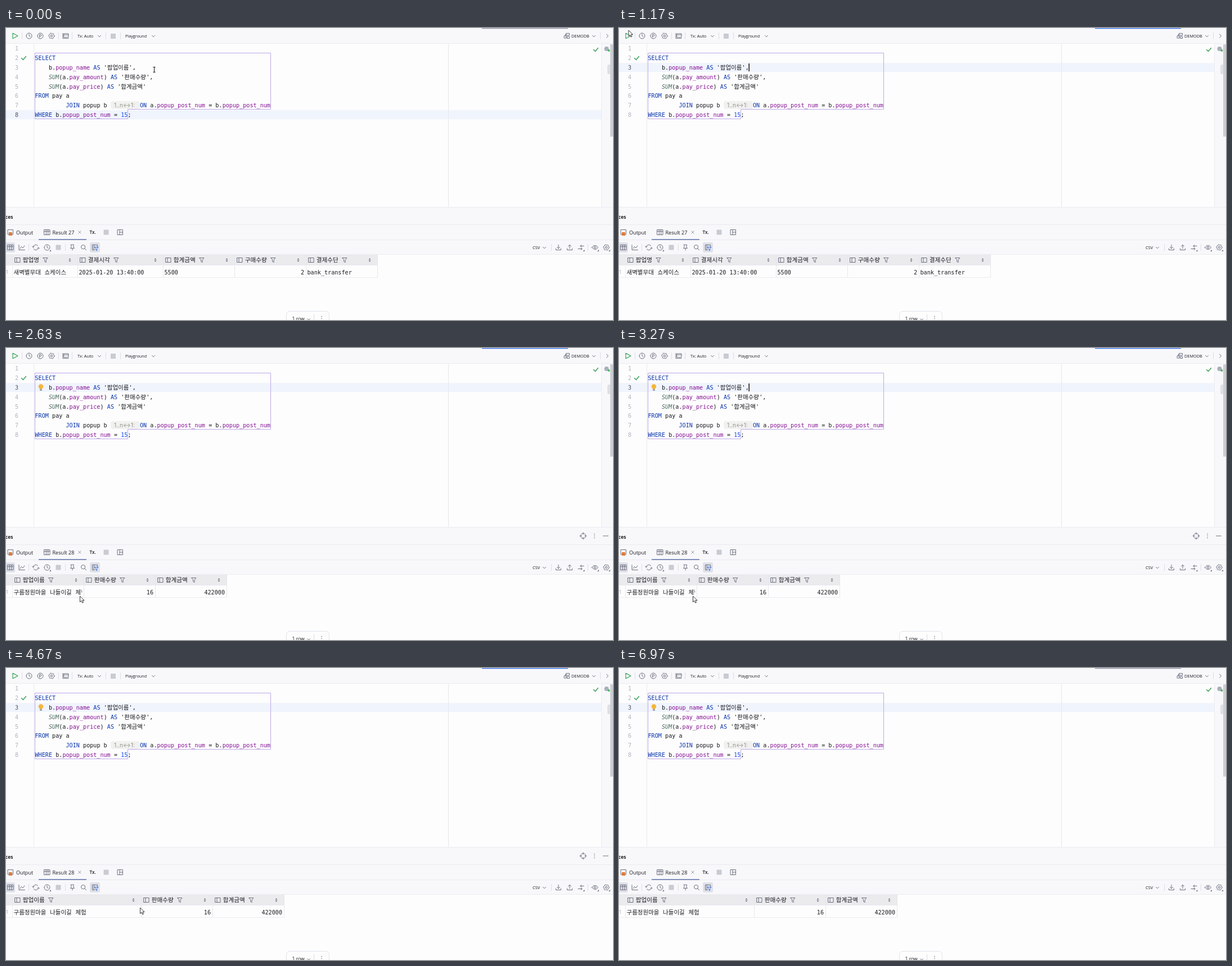
An HTML page for the animation above (7 s loop, 1079 by 519 pixels).

```html
<!DOCTYPE html>
<html lang="ko">
<head>
<meta charset="utf-8">
<title>SQL console</title>
<style>
html, body { margin: 0; width: 100%; height: 100%; overflow: hidden; background: #fdfdfd; }
svg { display: block; position: absolute; left: 0; top: 0; }
text { white-space: pre; fill: #1c1d22; }
.m { font: 10.15px "DejaVu Sans Mono", monospace; }
.k { font: 10.5px "Noto Sans CJK KR", "Noto Sans CJK", sans-serif; word-spacing: 3.7px; }
.h { font: 10.6px "Noto Sans CJK KR", "Noto Sans CJK", sans-serif; }
.u { font: 9.1px "Open Sans", "Noto Sans", sans-serif; }
.s { font: 7.5px "Open Sans", "Noto Sans", sans-serif; }
.i { fill: none; stroke: #6c707e; stroke-width: 1; stroke-linecap: round; stroke-linejoin: round; }
</style>
</head>
<body>
<svg id="stage" width="1079" height="519" viewBox="0 0 1079 519"></svg>
<script>
const LOOP = 7000;
const T = { click: 500, run: 1600, bulb: 1800, blur: 6750 };
const PANEL = '#f8f8fb', EDGE = '#ebecf0', ICON = '#6c707e', GREEN = '#3fa35a';
const KEY = '#0a35ad', COL = '#871094', INK = '#17181c', FUNC = '#4d6b60', NUM = '#1750eb';

const rect = (x, y, w, h, fill, more = '') =>
  `<rect x="${x}" y="${y}" width="${w}" height="${h}" fill="${fill}" ${more}/>`;
const text = (x, y, str, cls, more = '') =>
  `<text x="${x}" y="${y}" class="${cls}" ${more}>${str.replace(/</g, '&lt;').replace(/>/g, '&gt;')}</text>`;
const tint = c => `style="fill:${c}"`;
const endAt = 'text-anchor="end"';
const icon = (x, y, d, more = '') =>
  `<path class="i" transform="translate(${x} ${y})" d="${d}" ${more}/>`;
const ring = r => `M${-r} 0a${r} ${r} 0 1 0 ${2 * r} 0a${r} ${r} 0 1 0 ${-2 * r} 0`;
const box = (x, y, w, h) => `M${x} ${y}h${w}v${h}h${-w}z`;
const vline = (x, y, h, c = '#dcdee5') => rect(x, y, 1, h, c);

const CLOCK = ring(5) + 'M0-3V0L2.3 1.5';
const CHEVRON = 'M-2.5-1.2L0 1.3L2.5-1.2';
const TABLE = box(-5, -4.5, 10, 9) + 'M-5-1.5H5M-1.7-4.5V4.5M1.7-4.5V4.5';
const COLUMN = box(-4.5, -4, 9, 8) + 'M-1.5-4V4';
const FUNNEL = 'M-4-4H4L1.2-.3V4L-1.2 2.7V-.3z';
const LAYOUT = box(-4.5, -4.5, 9, 9) + 'M-1-4.5V4.5M-1 0H4.5';
const gear = () => {
  let d = '';
  for (let n = 0; n < 24; n++) {
    const a = n * Math.PI / 12, r = n % 4 < 2 ? 5.2 : 4.1;
    d += (n ? 'L' : 'M') + (r * Math.cos(a)).toFixed(2) + ' ' + (r * Math.sin(a)).toFixed(2);
  }
  return d + 'z' + ring(1.7);
};
const dots = (x, y) => [-3.5, 0, 3.5].map(d =>
  `<circle cx="${x}" cy="${y + d}" r=".8" fill="${ICON}"/>`).join('');
const corner = (x, y) => `<path d="M${x} ${y}v-3l-3 3z" fill="${ICON}"/>`;
const stop = (x, y) => rect(x - 4.5, y - 4.5, 9, 9, '#c9cbd3', 'rx="1"');

const lineY = n => 40.2 + 16.83 * (n - 1);
const colX = n => 51.5 + 6.11 * n;

// Each part: text, colour, optional class; Hangul glyphs are wider than the mono cells.
function codeLine(n, col, parts, x = colX(col)) {
  return parts.map(([str, color, cls = 'm']) => {
    const out = text(x, lineY(n), str, cls, `style="fill:${color}${color === FUNC ? ';font-style:italic' : ''}"`);
    x += str.length * (cls === 'k' ? 9.7 : 6.11);
    return out;
  }).join('');
}
const alias = (str, tail) => [['AS ', KEY], ["'", INK], [str, INK, 'k'], ["'" + tail, INK]];

function code() {
  return codeLine(2, 0, [['SELECT', KEY]]) +
    codeLine(3, 4, [['b.', INK], ['popup_name ', COL], ...alias('팝업이름', ',')]) +
    codeLine(4, 4, [['SUM', FUNC], ['(a.', INK], ['pay_amount', COL], [') ', INK], ...alias('판매수량', ',')]) +
    codeLine(5, 4, [['SUM', FUNC], ['(a.', INK], ['pay_price', COL], [') ', INK], ...alias('합계금액', '')]) +
    codeLine(6, 0, [['FROM ', KEY], ['pay a', INK]]) +
    codeLine(7, 9, [['JOIN ', KEY], ['popup b', INK]]) +
    rect(186, 130, 52, 14, '#f1f1f0', 'rx="4"') +
    text(192, 140.5, '1..n<->1:', 'm', 'style="font:10.2px Inter,sans-serif;fill:#96968e"') +
    codeLine(7, 0, [['ON ', KEY], ['a.', INK], ['popup_post_num', COL], [' = b.', INK], ['popup_post_num', COL]], 238) +
    codeLine(8, 0, [['WHERE ', KEY], ['b.', INK], ['popup_post_num', COL], [' = ', INK], ['15', NUM], [';', INK]]);
}

function topBar() {
  return rect(0, 0, 1079, 27, PANEL) + rect(0, 27, 1079, 1, EDGE) +
    icon(16, 14, 'M-4-4.8L5 0L-4 4.8z', `style="stroke:${GREEN};stroke-width:1.2"`) +
    [28, 93, 117, 177, 203].map(x => vline(x, 8, 12)).join('') +
    icon(41, 14, CLOCK) + icon(61, 14, ring(5) + 'M-1.4 2.8V-2.6H.3a1.6 1.6 0 0 1 0 3.2H-1.4') +
    icon(81, 14, gear()) + icon(106, 14, box(-3, -4, 8, 6.5) + 'M-5-4.5V4.5H5M-3-1.8H5') +
    text(127, 17, 'Tx: Auto', 's') + icon(166, 14.5, CHEVRON) + stop(190.5, 14.5) +
    text(212, 17, 'Playground', 's', 'style="font-size:7.2px"') + icon(262, 14.5, CHEVRON) +
    icon(997, 14, box(-1, -4.5, 5.5, 3.5) + box(-4.5, 0, 3.5, 4) + box(1, 1, 3.5, 3.5) + 'M-3 0V-2.5H-1') +
    text(1005, 17, 'DEMODB', 's', 'style="font-size:7.3px"') + icon(1045, 14.5, CHEVRON) +
    vline(1056, 8, 12) + icon(1069, 14, 'M-1.5-3L1.5 0L-1.5 3');
}

function editor() {
  const check = 'M-4 0L-1 3L4-3';
  const green = `style="stroke:${GREEN};stroke-width:1.5"`;
  return rect(0, 28, 1079, 290, '#fdfdfd') + '<g id="lineMark"></g>' +
    vline(49, 28, 290, EDGE) + vline(786, 28, 290, '#e6e7ec') +
    rect(1059, 28, 20, 290, PANEL) + vline(1058, 28, 290, EDGE) +
    rect(1069, 65, 10, 17, '#dfe1e8', 'rx="3"') + rect(1074, 29, 5, 164, '#cdced3') +
    '<circle cx="1067.5" cy="37" r="4" fill="#a9b0b9"/><circle cx="1071.5" cy="40" r="2" fill="#4bb563"/>' +
    icon(31.5, 53.5, check, green) + icon(1048.5, 38.5, check, green) +
    '<path d="M51.5 44.5H470.5V144.5H216.5V161.5H51.5z" fill="none" stroke="#bda9e8"/>' + code() +
    `<g id="bulb"><circle cx="62" cy="68.5" r="4.2" fill="#f4b63c"/>${rect(60, 72, 4, 1.4, '#e0a02e')}${rect(60, 74, 4, 1.4, '#6c707e')}</g>` +
    rect(230.5, 63, 1.4, 14, '#000', 'id="caret"');
}

function panel() {
  const y = 390;
  return rect(0, 318, 1079, 85, PANEL) +
    [318, 349, 376, 402].map(v => rect(0, v, 1079, 1, EDGE)).join('') +
    text(12.5, 338.5, 'Services', 'u', endAt + ' style="font-size:8.5px;font-weight:700"') +
    `<g id="tools">${icon(1026, 334, ring(4.6) + 'M0-6V-2.5M0 6V2.5M-6 0H-2.5M6 0H2.5')}${dots(1046, 334)}${icon(1066, 334, 'M-4.5 0H4.5')}</g>` +
    icon(8, 363, box(-4.5, -4.5, 9, 8.5)) + rect(5, 363, 6, 6, '#d97b3f') +
    text(18, 367, 'Output', 'u') +
    icon(73, 363, TABLE) + '<g id="tab"></g>' + icon(131, 363, 'M-2.3-2.3L2.3 2.3M-2.3 2.3L2.3-2.3', 'style="stroke:#9a9da8"') +
    rect(58, 375, 85, 2, '#8190ba') +
    text(148.5, 366.3, 'Tx.', 'u', 'style="font-size:8.3px;font-weight:600"') + stop(178, 363) + icon(203, 363, LAYOUT) +
    rect(-2, 381, 18, 18, '#dfe1ea', 'rx="3"') + icon(8, y, TABLE) +
    icon(28, y, 'M-5-4.5V4.5H5.5M-3 2L-.5-1.5L2 1L5-3') + vline(40, 384, 12) +
    icon(53, y, 'M-4.8-.5A4.8 4.8 0 0 1 3.8-2.8M4.8.5A4.8 4.8 0 0 1-3.8 2.8M-6.3-2L-4.8 0L-3-1.5M6.3 2L4.8 0L3 1.5') +
    icon(73, y, CLOCK) + corner(80, 397) + stop(93, y) + vline(105, 384, 12) +
    icon(118, y, 'M-2.5-4.8H2.5L1.8-1L3.5 1.5H-3.5L-1.8-1zM0 1.5V5') +
    icon(138, y, 'M-4.5-.8a3.6 3.6 0 1 0 7.2 0a3.6 3.6 0 1 0-7.2 0M1.7 1.8L4.7 4.8') +
    rect(149, 381, 18, 18, '#dfe1ea', 'rx="3"') +
    icon(158, y, 'M-1 4.5H-4.5V-4.5H4.5V-1.5M-1.8-4.5V4.5') +
    icon(160.5, 392, 'M-3-2.5H3.5L1 .5V3.5L-.7 2.8V.5z', 'style="stroke:#4673d2;fill:#dce6fb"') +
    text(936, 393, 'CSV', 's') + icon(957, 390.5, CHEVRON) + vline(969, 384, 12) +
    icon(982, y, 'M0-4.5V2M-2.5-.5L0 2L2.5-.5M-4.5 2V4.5H4.5V2') +
    icon(1002, y, 'M0 2V-4.5M-2.5-2L0-4.5L2.5-2M-4.5 2V4.5H4.5V2') +
    icon(1022, y, 'M-5 2.5H2M0 .5L2 2.5L0 4.5M5-2.5H-1M1-4.5L-1-2.5L1-.5') + corner(1028.5, 397) +
    vline(1034, 384, 12) + icon(1047, y, 'M-5.5 0Q0-7.5 5.5 0Q0 7.5-5.5 0z' + ring(1.8)) + corner(1054, 397) +
    icon(1067, y, gear()) + corner(1074, 397);
}

function pager() {
  return rect(498.5, 503.5, 76, 30, '#fdfdfd', 'rx="6" stroke="#e1e3ea"') +
    text(508.5, 520.3, '1 row', 'u', 'style="font-size:8.6px"') +
    icon(538, 518, CHEVRON) + vline(547, 509, 12) + dots(561, 516);
}

const before = [
  { name: '팝업명', to: 127, val: '새벽별무대 쇼케이스', cls: 'k' },
  { name: '결제시각', to: 279, val: '2025-01-20 13:40:00' },
  { name: '합계금액', to: 406, val: '5500' },
  { name: '구매수량', to: 533, val: '2', right: true },
  { name: '결제수단', to: 660, val: 'bank_transfer' }
];
const after = grow => [
  { name: '팝업이름', to: 138 + grow, val: '구름정원마을 나들이길 체험', cls: 'k' },
  { name: '판매수량', to: 265 + grow, val: '16', right: true },
  { name: '합계금액', to: 392 + grow, val: '422000', right: true }
];

function grid(cols) {
  const end = cols[cols.length - 1].to;
  let left = 11;
  let out = rect(0, 403, end, 19, '#ebebee') + rect(0, 443, end + 1, 1, EDGE) + vline(11, 422, 21, EDGE) +
    text(-.5, 437, '1', 'u', tint('#a8adbd'));
  cols.forEach((c, n) => {
    const label = left + 18.7, stopX = label + c.name.length * 9.8;
    out += icon(left + 9.5, 412.5, COLUMN) + text(label, 416.2, c.name, 'h') + icon(stopX + 11, 412.5, FUNNEL) +
      `<path d="M${c.to - 15.5} 411.7h4l-2-2.4zM${c.to - 15.5} 413.3h4l-2 2.4z" fill="${ICON}"/>` +
      `<clipPath id="cell${n}">${rect(left, 422, c.to - left - 3, 21, '#000')}</clipPath>` +
      `<g clip-path="url(#cell${n})">${text(c.right ? c.to - 3 : left + 2.5, 437.6, c.val, c.cls || 'm', c.right ? endAt : '')}</g>` +
      vline(c.to, 403, 40, '#e6e7ec');
    left = c.to;
  });
  return out;
}

const stage = document.getElementById('stage');
stage.innerHTML = rect(0, 0, 1079, 519, '#fdfdfd') + topBar() + editor() + panel() + '<g id="grid"></g>' + pager() +
  rect(846, 0, 153, 1.3, '#3574f0', 'id="focus"') +
  '<path id="beam" d="M-2-4.5H2M0-4.5V4.5M-2 4.5H2" fill="none" stroke="#111"/>' +
  '<path id="arrow" d="M0 0V10.5L2.5 8.3L4.2 12L6 11.2L4.4 7.6H7.6z" fill="#fff" stroke="#222" stroke-width=".9"/>';
const el = id => document.getElementById(id);

// time, x, y
const path = [
  [0, 263.5, 74], [600, 263.5, 74], [1050, 17, 4], [1550, 17, 4],
  [2150, 131.5, 441], [3650, 131.5, 441], [3880, 141, 418], [3960, 141, 418],
  [4050, 138, 415], [4380, 240, 425], [4480, 238.5, 426], [4750, 238.5, 426],
  [5100, 300, -20], [LOOP, 300, -20]
];
function pointer(t) {
  let n = 1;
  while (n < path.length - 1 && path[n][0] < t) n++;
  const [t0, x0, y0] = path[n - 1], [t1, x1, y1] = path[n];
  const p = (t - t0) / (t1 - t0), e = p * p * (3 - 2 * p);
  return [x0 + (x1 - x0) * e, y0 + (y1 - y0) * e];
}

const show = (id, on) => el(id).setAttribute('visibility', on ? 'visible' : 'hidden');
const last = {};
function update(id, key, make) {
  if (last[id] === key) return;
  last[id] = key;
  el(id).innerHTML = make();
}

function lineMark(active) {
  let out = rect(0, lineY(active) - 11.7, 1058, 16, '#f0f4fd');
  for (let n = 1; n <= 8; n++)
    out += text(19, lineY(n), String(n), 'm', `text-anchor="middle" ${tint(n === active ? '#4e5264' : '#aeb3c2')}`);
  return out;
}

function render(t) {
  const [x, y] = pointer(t);
  const clicked = t >= T.click, ran = t >= T.run;
  const focused = clicked && t < T.blur;
  const grow = t < 4050 ? 0 : t > 4380 ? 102 : Math.round(x - 138);
  const line = clicked ? 3 : 8;
  update('lineMark', line, () => lineMark(line));
  update('tab', ran, () => text(82.5, 367, ran ? 'Result 28' : 'Result 27', 'u'));
  update('grid', ran ? grow : 'first', () => grid(ran ? after(grow) : before));
  el('focus').setAttribute('fill', focused ? '#3574f0' : '#9095a8');
  show('bulb', t >= T.bulb);
  show('caret', focused && (t < 1300 || (t + 200) % 1000 < 500));
  show('tools', y > 318);
  const inEditor = x > 50 && x < 1058 && y > 28 && y < 318;
  show('beam', inEditor);
  show('arrow', !inEditor);
  for (const id of ['beam', 'arrow']) el(id).setAttribute('transform', `translate(${x} ${y})`);
}

const start = performance.now();
function tick() {
  render((performance.now() - start) % LOOP);
  requestAnimationFrame(tick);
}
tick();
</script>
</body>
</html>
```
